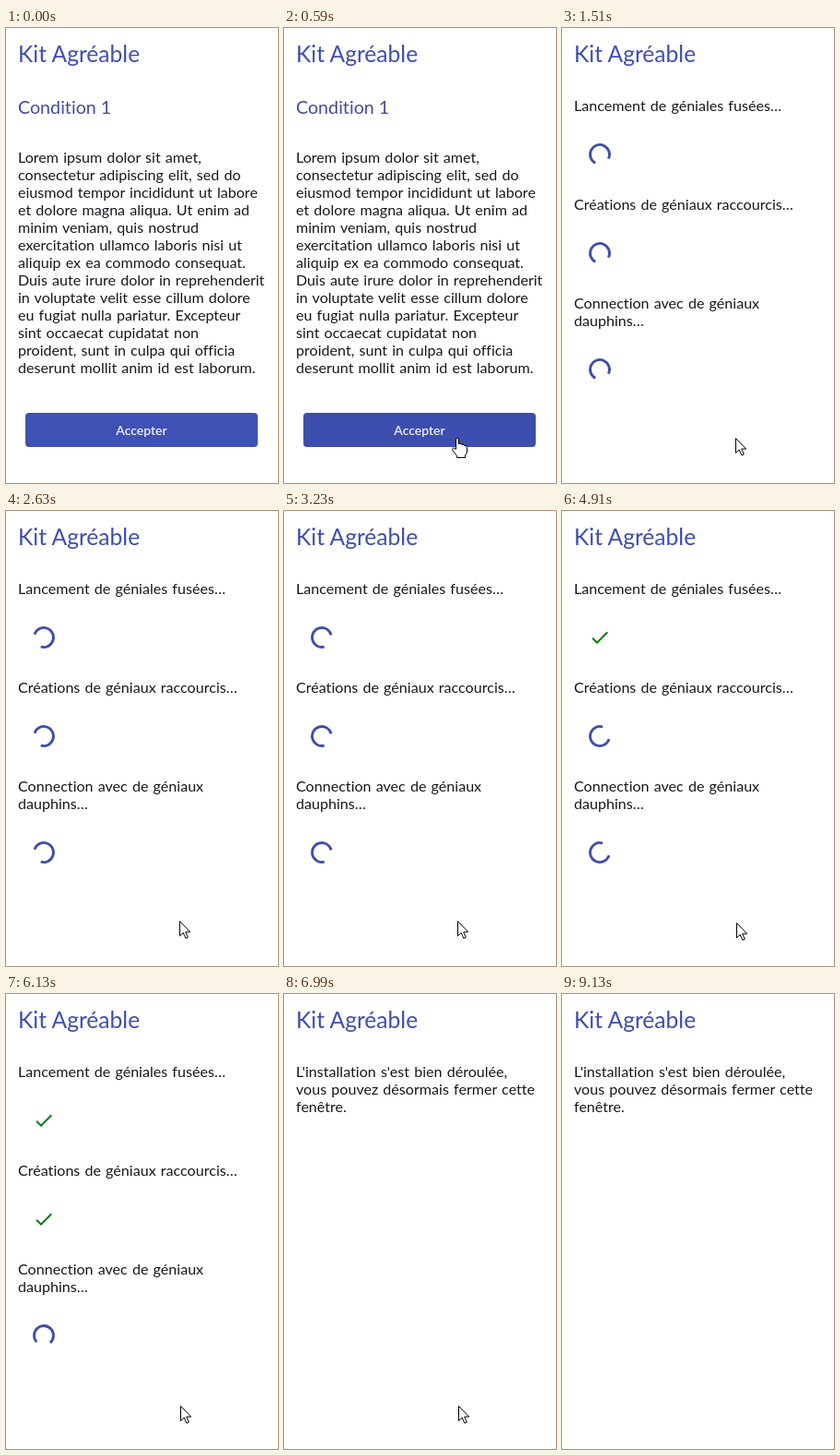
An HTML page for the animation above (9.53 s loop, 295 px wide and 493 px high).

```html
<!DOCTYPE html>
<html lang="fr">
<head>
<meta charset="utf-8">
<title>Installation</title>
<style>
  html, body { margin: 0; width: 100%; height: 100%; overflow: hidden; background: #fff; }
  svg { display: block; width: 100%; height: 100%; }
  text {
    font: 16.1px Lato, "Open Sans", sans-serif;
    font-variant-ligatures: none;
    word-spacing: 1px;
    fill: #18181c;
  }
  .title { font-size: 24.6px; fill: #3f4eb0; word-spacing: 0; }
  .sub { font-size: 19.7px; fill: #434e96; word-spacing: 0; }
  .label { font-size: 14px; font-weight: 500; fill: #fff; text-anchor: middle; }
  .spin { fill: none; stroke: #3f4ea8; stroke-width: 2.8; }
  .check { fill: #087a12; }
  .cursor { fill: #fff; stroke: #000; stroke-linejoin: round; }
</style>
</head>
<body>
<svg viewBox="0 0 295 493">
  <text class="title" x="13" y="37">Kit Agréable</text>
  <g id="terms">
    <text class="sub" x="13" y="93">Condition 1</text>
    <rect id="button" x="21" y="417" width="252" height="37" rx="4"/>
    <text class="label" x="147" y="441">Accepter</text>
  </g>
  <g id="progress"></g>
  <g id="done"></g>
  <path id="arrow" class="cursor" d="M.5 .5V16.5L4.2 13 6.9 19 9.3 18 6.7 12.1H11.7Z"/>
  <path id="hand" class="cursor" d="M-1.5 12V1.8Q-1.5 .5 0 .5T1.5 1.8V6.5Q4.5 5.5 4.7 7.5 7.5 6.5 7.7 8.5 10.5 8 10.5 10.5V15Q10.5 17 8.5 19V21.5H-.5V19.5L-5.2 13.5Q-6 11.5-4.5 11-3 10.6-1.5 13"/>
</svg>
<script>
const LOOP = 9530, START = 1390, END = 6990, SPIN = 913;
const $ = id => document.getElementById(id);

function add(parent, tag, attrs) {
  const el = document.createElementNS('http://www.w3.org/2000/svg', tag);
  for (const key in attrs) el.setAttribute(key, attrs[key]);
  return parent.appendChild(el);
}

function addLines(parent, y, lines) {
  lines.forEach((line, i) => {
    add(parent, 'text', { x: 13, y: y + 19 * i }).textContent = line;
  });
}

const show = (el, on) => el.setAttribute('display', on ? 'inline' : 'none');
const mix = (a, b, k) => a + (b - a) * k;

addLines($('terms'), 146, [
  'Lorem ipsum dolor sit amet,',
  'consectetur adipiscing elit, sed do',
  'eiusmod tempor incididunt ut labore',
  'et dolore magna aliqua. Ut enim ad',
  'minim veniam, quis nostrud',
  'exercitation ullamco laboris nisi ut',
  'aliquip ex ea commodo consequat.',
  'Duis aute irure dolor in reprehenderit',
  'in voluptate velit esse cillum dolore',
  'eu fugiat nulla pariatur. Excepteur',
  'sint occaecat cupidatat non',
  'proident, sunt in culpa qui officia',
  'deserunt mollit anim id est laborum.'
]);
addLines($('done'), 90, [
  "L'installation s'est bien déroulée,",
  'vous pouvez désormais fermer cette',
  'fenêtre.'
]);

const tasks = [
  { y: 90, icon: 137, end: 3390, lines: ['Lancement de géniales fusées…'] },
  { y: 197, icon: 244, end: 5190, lines: ['Créations de géniaux raccourcis…'] },
  { y: 304, icon: 370, end: END, lines: ['Connection avec de géniaux', 'dauphins…'] }
];
for (const task of tasks) {
  addLines($('progress'), task.y, task.lines);
  const icon = add($('progress'), 'g', { transform: `translate(41 ${task.icon})` });
  // Three quarters of a ring, open at the top
  task.spin = add(icon, 'path', { class: 'spin', d: 'M7.425-7.425A10.5 10.5 0 1 1-7.425-7.425' });
  task.check = add(icon, 'path', {
    class: 'check',
    d: 'M9 16.17L4.83 12l-1.42 1.41L9 19 21 7l-1.41-1.41z',
    transform: 'translate(-12 -12)'
  });
}

function cursorAt(t) {
  if (t < 300 || t >= 9130) return null;
  if (t < 590) {
    const k = 1 - (1 - (t - 300) / 290) ** 2;
    return [mix(222, 188, k), mix(488, 444, k)];
  }
  if (t < 3350) return [188, 444];
  if (t < 7920) return [189, 446];
  if (t < 7950) return [190, 446];
  const k = Math.max(0, (t - 8880) / 250) ** 1.5;
  return [mix(191, 254, k), mix(447, 493, k)];
}

function draw(t) {
  show($('terms'), t < START);
  show($('progress'), t >= START && t < END);
  show($('done'), t >= END);

  const angle = t / SPIN * 360 - 74;
  for (const task of tasks) {
    show(task.spin, t < task.end);
    show(task.check, t >= task.end);
    task.spin.setAttribute('transform', `rotate(${angle})`);
  }

  const pos = cursorAt(t);
  const hover = pos && t < START && pos[1] < 454;
  $('button').setAttribute('fill', hover ? '#3d4eae' : '#3f51b5');
  show($('arrow'), pos && !hover);
  show($('hand'), hover);
  if (pos) {
    const move = `translate(${pos.map(Math.round)})`;
    $('arrow').setAttribute('transform', move);
    $('hand').setAttribute('transform', move);
  }
}

const origin = performance.now();
function frame() {
  draw((performance.now() - origin) % LOOP);
  requestAnimationFrame(frame);
}
frame();
</script>
</body>
</html>
```
